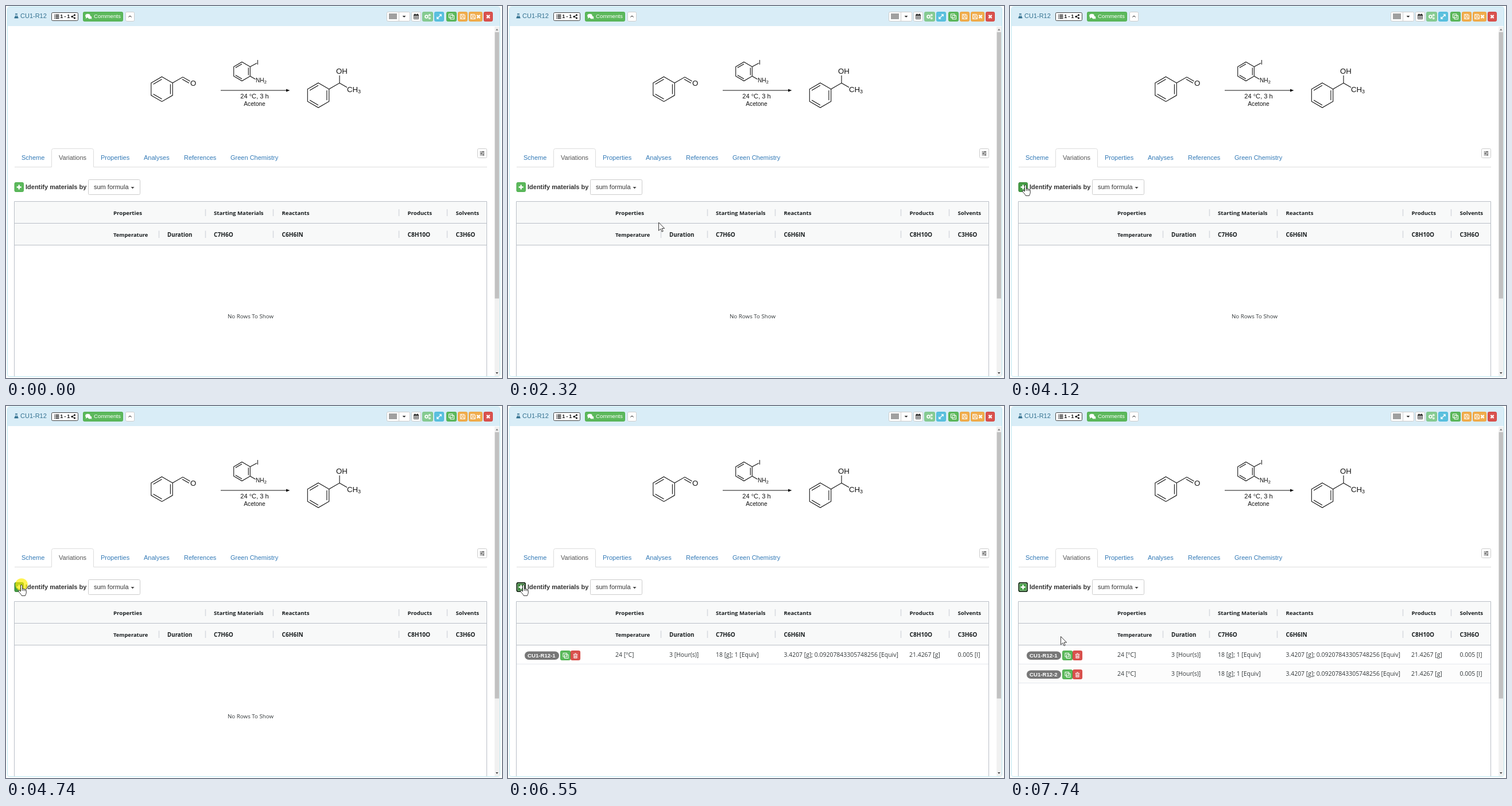
Recreate the animation shown at these times as an HTML page. Size 864x648 px, loop 8 s.

```html
<!DOCTYPE html>
<html lang="en">
<head>
<meta charset="utf-8">
<title>Reaction variations</title>
<style>
html, body { margin: 0; width: 100%; height: 100%; overflow: hidden; background: #fff; }
svg { display: block; width: 864px; height: 648px; font: 11px "Liberation Sans", Arial, sans-serif; }
text { white-space: pre; }
.grid { font-family: "Open Sans", "Noto Sans", sans-serif; fill: #33383a; }
.head { font-weight: 700; font-size: 9.65px; fill: #181d1f; }
.line { fill: none; stroke: #111; }
.icon { fill: none; stroke: #fff; }
</style>
</head>
<body>
<svg id="stage" viewBox="0 0 864 648"></svg>
<script>
const stage = document.getElementById('stage');

const text = (x, y, s, attrs = '') => `<text x="${x}" y="${y}" ${attrs}>${s}</text>`;
const path = (d, attrs = 'class="line"') => `<path d="${d}" ${attrs}/>`;
const rect = (x, y, w, h, fill, attrs = '') =>
  `<rect x="${x}" y="${y}" width="${w}" height="${h}" fill="${fill}" ${attrs}/>`;
const button = (x, y, w, h, fill, border) =>
  rect(x + .5, y + .5, w - 1, h - 1, fill, `rx="2" stroke="${border}"`);
const at = (x, y, s) => `<g transform="translate(${x} ${y})">${s}</g>`;

const GREEN = ['#5cb85c', '#4cae4c'], RED = ['#d9534f', '#d43f3a'], ORANGE = ['#f0ad4e', '#eea236'],
  BLUE = ['#5bc0de', '#46b8da'], WHITE = ['#fff', '#ccc'], FADED = ['#86cb92', '#7cc588'];

// Icons are centred on 0,0
const copyIcon = path('M-4.5-4.5H2V2H-4.5ZM-2-2H4.5V4.5H-2Z', 'fill="#5cb85c" stroke="#fff"');
const trashIcon = path('M-3.5-2.5H3.5M-1.2-3.8H1.2M-2.6-2V4H2.6V-2M-.9-.8V3M.9-.8V3', 'class="icon"');
const saveIcon = path('M-4-4H2.5L4-2.5V4H-4ZM-2-4V-1.2H1.8V-4M-2.2 4V1H2.2V4', 'class="icon"');
const crossIcon = path('M-2.6-2.6L2.6 2.6M2.6-2.6L-2.6 2.6', 'class="icon" stroke-width="2.2"');
const plusIcon = path('M-4 0H4M0-4V4', 'class="icon" stroke-width="2.4"');
const caret = path('M-3-1.3H3L0 1.8Z', 'fill="#333"');
const calendarIcon = path('M-4-3.5H4V4.2H-4ZM-4-1.2H4M-1.4-1V4M1.4-1V4M-4 1.5H4', 'fill="none" stroke="#333" stroke-width=".8"')
  + path('M-4-2.8H4M-2-5V-2.5M2-5V-2.5', 'class="line" stroke-width="1.5"');
const cogsIcon = '<g class="icon"><circle cx="-2" r="2.4" stroke-width="1.8"/>'
  + '<circle cx="3.3" cy="-2.6" r="1.3" stroke-width="1.2"/><circle cx="3.3" cy="2.8" r="1.3" stroke-width="1.2"/></g>';
const expandIcon = path('M-3 3L3-3M.3-3.6H3.6V-.3M-3.6 .3V3.6H-.3', 'class="icon" stroke-width="1.4"');

function ring(cx, cy, r, gap) {
  const corner = (k, rad) => {
    const a = (k * 60 - 90) * Math.PI / 180;
    return `${(cx + rad * Math.cos(a)).toFixed(2)} ${(cy + rad * Math.sin(a)).toFixed(2)}`;
  };
  let d = 'M' + [0, 1, 2, 3, 4, 5].map(k => corner(k, r)).join('L') + 'Z';
  for (const k of [1, 3, 5]) d += `M${corner(k, r - gap)}L${corner(k + 1, r - gap)}`;
  return path(d);
}

function header() {
  const tools = [
    [706, 17, WHITE, calendarIcon], [725, 19, FADED, cogsIcon], [746, 17, BLUE, expandIcon],
    [767, 18, GREEN, copyIcon], [787, 17, ORANGE, saveIcon],
    [806, 24, ORANGE, at(-4.5, 0, saveIcon) + at(5, 0, crossIcon)], [832, 16, RED, crossIcon]
  ];
  const share = [[119.5, 15.8], [115, 18.4], [119.5, 21]];
  return rect(2.5, 1.5, 858, 644, '#fff', 'rx="3" stroke="#bce8f1"')
    + rect(3, 2, 857, 33, '#d9edf7')
    + path('M16 13.5H20M17 13.5V16.5L14.7 21H21.3L19 16.5V13.5', 'fill="none" stroke="#31708f" stroke-width=".9"')
    + path('M16 18H20L21.3 21H14.7Z', 'fill="#31708f"')
    + text(25, 21.3, 'CU1-R12', 'fill="#31708f"')
    + rect(79.5, 11.5, 46, 14, '#fff', 'rx="2" stroke="#444"')
    + path('M84 15H85.2M84 17.2H85.2M84 19.4H85.2M84 21.6H85.2M86.2 15H92.5M86.2 17.2H92.5M86.2 19.4H92.5M86.2 21.6H92.5', 'class="line" stroke-width="1.2"')
    + text(94.5, 21.3, '1 - 1', 'font-size="8.3" font-weight="700"')
    + path('M' + share.map(p => p.join(' ')).join('L'))
    + share.map(([x, y]) => `<circle cx="${x}" cy="${y}" r="1.5"/>`).join('')
    + button(134, 10, 70, 17, ...GREEN)
    + '<ellipse cx="142.5" cy="17" rx="4.3" ry="3.3" fill="#fff"/><ellipse cx="146" cy="20" rx="3.2" ry="2.4" fill="#fff"/>'
    + path('M139.5 19L138.7 22L142 20ZM147 21L149.5 23.2L148.8 20Z', 'fill="#fff"')
    + text(153, 21.2, 'Comments', 'fill="#fff" font-size="9.7"')
    + button(208, 10, 16, 17, ...WHITE) + path('M213.5 19.5L216 17L218.5 19.5')
    + button(663, 10, 41, 17, ...WHITE) + path('M684.5 10V27', 'stroke="#ccc"')
    + rect(667, 13, 14, 10, '#a0a0a0') + at(693.5, 18.3, caret)
    + tools.map(([x, w, colors, icon]) => button(x, 10, w, 17, ...colors) + at(x + w / 2, 18.5, icon)).join('')
    + rect(851, 36, 9, 609, '#f1f1f1') + rect(851.5, 45.5, 7.5, 464, '#c1c1c1')
    + path('M853 42.5H857.5L855.2 39.5Z', 'fill="#777"') + path('M853 638H857.5L855.2 641Z', 'fill="#444"');
}

function scheme() {
  return '<g stroke-width="1.1">'
    + ring(271.5, 144.8, 21.6, 4.4) + ring(411, 114, 16.5, 3.5) + ring(544, 155.5, 21.6, 4.4)
    + path('M290.2 134L308 123.8L320.5 131M307 127.5L318.8 134.3')
    + path('M425.3 105.7L437 99.5M425.3 122.3L434.5 127.5')
    + path('M562.7 144.7L581 134.3V121M581 134.3L594 141.8')
    + path('M374 147H490') + '</g>'
    + path('M488 144.5L494.5 147L488 149.5Z', 'fill="#111"')
    + '<g fill="#111">'
    + text(321, 139, 'O', 'font-size="13.2"') + text(437, 102, 'I', 'font-size="10.5"')
    + text(435, 132.5, 'NH<tspan font-size="7.5" dy="2">2</tspan>', 'font-size="10.2"')
    + text(575, 117.5, 'OH', 'font-size="13.2"')
    + text(594, 150, 'CH<tspan font-size="9" dy="2.2">3</tspan>', 'font-size="13.2"')
    + text(433, 160.7, '24 °C, 3 h', 'text-anchor="middle" font-size="11.1"')
    + text(433, 173.8, 'Acetone', 'text-anchor="middle" font-size="10.2"') + '</g>';
}

function tabs() {
  const names = [[27, 'Scheme'], [92, 'Variations'], [165, 'Properties'], [240, 'Analyses'],
    [310, 'References'], [391, 'Green Chemistry']];
  return path('M15 280.5H79.5V251.5Q79.5 248.5 82.5 248.5H149.5Q152.5 248.5 152.5 251.5V280.5H838', 'fill="none" stroke="#ddd"')
    + names.map(([x, s]) => text(x, 268, s, `fill="${x === 92 ? '#555' : '#337ab7'}"`)).join('')
    + button(821, 248, 17, 17, ...WHITE)
    + path('M825.5 254H833.5M825.5 256.7H833.5M825.5 259.4H833.5', 'fill="none" stroke="#333" stroke-width=".9"')
    + path('M831 252.8V255.2M828 255.5V257.9M831.5 258.2V260.6', 'fill="none" stroke="#333" stroke-width="1.2"')
    + text(34, 319.3, 'Identify materials by', 'font-weight="700" fill="#333"')
    + button(143, 302, 91, 27, ...WHITE) + text(153, 319.3, 'sum formula', 'fill="#333"') + at(220.5, 316.5, caret);
}

function grid() {
  const top = [[187, 'Properties'], [362, 'Starting Materials'], [480.5, 'Reactants'], [699.5, 'Products'], [783.5, 'Solvents']];
  const sub = [[187, 'Temperature', 9.35], [281, 'Duration', 9.75], [362, 'C7H6O', 10.1],
    [480.5, 'C6H6IN', 10.1], [699.5, 'C8H10O', 10.1], [783.5, 'C3H6O', 10.1]];
  const bars = [347.5, 465.5, 684.5, 768.5];
  return rect(15, 340, 823, 76, '#f8f9f9')
    + path('M14.5 645V340.5H837.5V645M15 378.5H837M15 416.5H837', 'fill="none" stroke="#babfc7"')
    + path(bars.map(x => `M${x} 354V366M${x} 391.5V404`).join('') + 'M266.5 391.5V404', 'stroke="#d5d9df" stroke-width="1.5"')
    + '<g class="grid head">'
    + top.map(([x, s]) => text(x, 363.8, s)).join('')
    + sub.map(([x, s, size]) => text(x, 401.6, s, `style="font-size:${size}px"`)).join('') + '</g>'
    + text(386, 543.7, 'No Rows To Show', 'id="empty" class="grid" font-size="9.77"');
}

function row(n) {
  const cells = [[187, '24 [°C]'], [281, '3 [Hour(s)]'], [362, '18 [g]; 1 [Equiv]'],
    [480.5, '3.4207 [g]; 0.09207843305748256 [Equiv]'], [699, '21.4267 [g]'], [783.5, '0.005 [l]']];
  return `<g id="row${n}" transform="translate(0 ${(n - 1) * 33})">`
    + rect(15, 417, 822, 32, n % 2 ? '#fff' : '#fcfcfc')
    + path('M15 449.5H837', 'stroke="#e4e8ee"')
    + rect(29, 427.5, 60, 14.5, '#777', 'rx="7.2"')
    + text(34, 438.3, `CU1-R12-${n}`, 'fill="#fff" font-weight="700" font-size="9.65"')
    + button(91, 426, 18, 17, ...GREEN) + at(100.5, 435, copyIcon)
    + button(109, 426, 17, 17, ...RED) + at(117.5, 435, trashIcon)
    + '<g class="grid" font-size="10.43">' + cells.map(([x, s]) => text(x, 437.3, s)).join('') + '</g></g>';
}

stage.innerHTML = header() + scheme() + tabs() + grid() + row(1) + row(2)
  + rect(15, 307.5, 15.5, 16, '#5cb85c', 'id="add" rx="2" stroke="#4cae4c"') + at(22.7, 315.5, plusIcon)
  + '<g id="focus">' + rect(15.5, 308, 14.5, 15, 'none', 'rx="2" stroke="#151f15" stroke-width="1.4"')
  + rect(16.8, 309.3, 11.9, 12.4, 'none', 'rx="1" stroke="#fff" stroke-width=".8" stroke-opacity=".6"') + '</g>'
  + '<circle id="click" cx="27" cy="311" r="10.8" fill="#ffee00" fill-opacity=".68"/>'
  + path('M.5.5V14.8L3.8 11.7L6.1 16.7L8.2 15.8L6 10.9H10.6Z', 'id="arrow" fill="#fff" stroke="#222" stroke-width=".9"')
  + path('M4.5 12V1.9a1.4 1.4 0 0 1 2.8 0V8c.3-1.3 2.5-1.2 2.6.3c.4-1 2.3-.8 2.4.6c.6-.8 2-.4 2 .9V14c0 2.5-1.5 3.5-1.7 5.5H6.3C6 17.5 2.5 14.5 .8 11.8c-.8-1.5 1-2.5 2-1.3L4.5 12M7.3 8V11M9.9 8.3V11.2M12.3 9V11.4',
    'id="hand" fill="#fff" stroke="#222" stroke-width=".9"');

// Pointer stops: time, x, y, shape
const stops = [[500, 721, 532, 'arrow'], [700, 720, 529, 'arrow'], [1730, 456, 448, 'arrow'], [1920, 271, 376, 'arrow'],
  [2320, 262, 376.5, 'arrow'], [2530, 92, 326, 'arrow'], [2720, 74, 326, 'arrow'], [2920, 42, 315, 'arrow'],
  [3120, 25, 311, 'hand'], [3930, 23, 311, 'hand'], [4120, 21, 311, 'hand'],
  [7350, 49, 331, 'arrow'], [7540, 83, 390, 'arrow'], [7740, 88, 401, 'arrow']];
const get = id => document.getElementById(id);
const show = (id, on) => get(id).setAttribute('visibility', on ? 'visible' : 'hidden');

function draw(now) {
  const t = now % 8000, within = (a, b) => t >= a && t < b;
  const stop = stops.filter(s => s[0] <= t).pop();
  for (const shape of ['arrow', 'hand']) show(shape, stop && stop[3] === shape);
  if (stop) get(stop[3]).setAttribute('transform', `translate(${stop[1]} ${stop[2]})`);

  const focused = t >= 4930, pressed = within(6550, 6740);
  get('add').setAttribute('fill', pressed ? '#398439' : t >= 3120 ? '#449d44' : '#5cb85c');
  get('add').setAttribute('stroke', focused ? '#255625' : t >= 3120 ? '#398439' : '#4cae4c');
  show('focus', focused);
  show('click', within(4740, 4930));
  show('empty', t < 4930);
  show('row1', t >= 4930);
  show('row2', t >= 6740);
  requestAnimationFrame(() => draw(performance.now()));
}
draw(performance.now());
</script>
</body>
</html>
```
